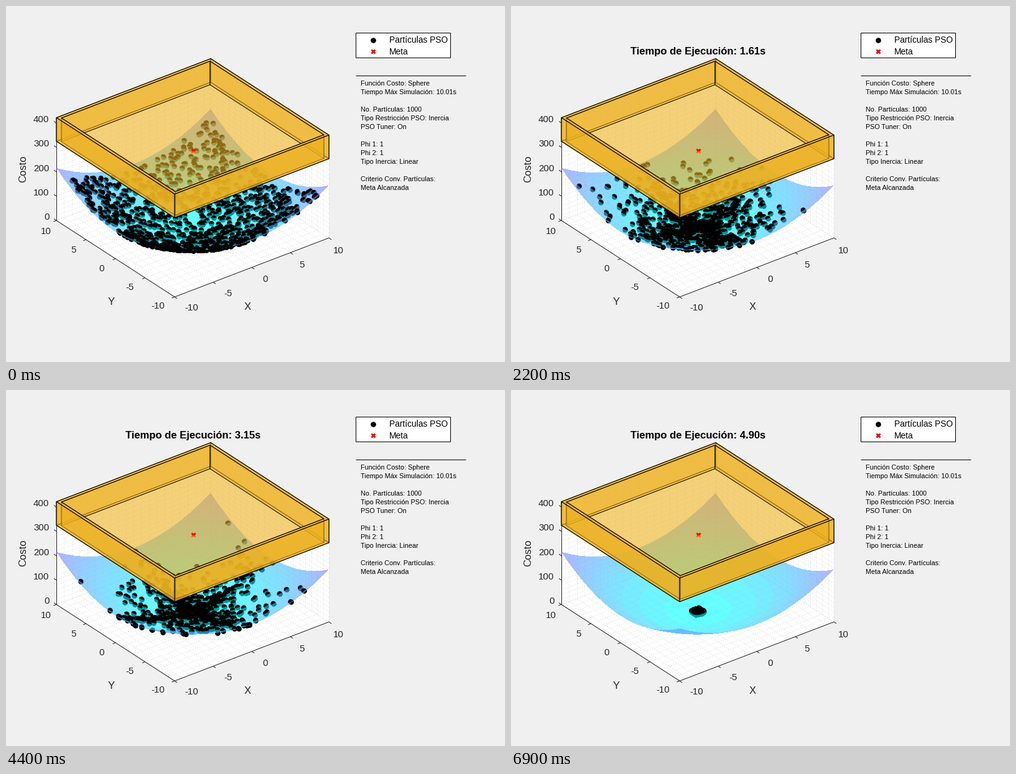
Write a matplotlib script that moves like this. It is 802 px wide and 573 px high and loops after 7000 ms.

```python
import numpy as np
import matplotlib.pyplot as plt
from matplotlib.animation import FuncAnimation
from matplotlib.collections import LineCollection, PolyCollection
from matplotlib.patches import PathPatch, Polygon, Rectangle
from matplotlib.path import Path

W, H, DPI = 802, 573, 100
PX = 72 / DPI                     # points per pixel
FRAMES, INTERVAL = 70, 100
TOP, BOTTOM, RIM = 165.5, 127.5, 0.963   # box heights in px, inner wall ratio
Z_UNIT = 0.3925                   # px per cost unit
BOWL, LIFT = 41, 2.5              # paraboloid height and offset in px
RADIUS = 4.3
GOLD = (0.929, 0.694, 0.125, 0.6)
INK = "0.15"

plt.rcParams["font.family"] = "Liberation Sans"
fig = plt.figure(figsize=(W / DPI, H / DPI), dpi=DPI, facecolor="#f0f0f0")
ax = fig.add_axes([0, 0, 1, 1])
ax.axis("off")
ax.set_autoscale_on(False)


def project(u, v, h=0):
    """Map normalised x, y in [-1, 1] and a height in px to the stage."""
    return 300 + 124 * u - 95 * v, 359.25 - 47.5 * u - 61.5 * v - h


def label(x, y, s, size, ha="left", **kw):
    """Text whose capitals are centred on y; size in px."""
    kw.setdefault("color", "black")
    return ax.text(x, y + 0.34 * size, s, fontsize=size * PX, ha=ha,
                   va="baseline", zorder=20, **kw)


def line(p, q, color=INK, z=1):
    ax.plot([p[0], q[0]], [p[1], q[1]], color=color, lw=PX, zorder=z,
            solid_capstyle="butt")


# ---------- axes box, grid, ticks ----------
def draw_axes():
    hull = [project(-1, 1), project(-1, 1, TOP), project(1, 1, TOP),
            project(1, -1, TOP), project(1, -1), project(-1, -1)]
    ax.add_patch(Polygon(hull, fc="white", ec="none", zorder=0))

    grid = []
    for k in np.linspace(-1, 1, 21):
        grid += [[project(k, -1), project(k, 1)],
                 [project(-1, k), project(1, k)],
                 [project(k, 1), project(k, 1, TOP)],
                 [project(1, k), project(1, k, TOP)]]
    for z in np.arange(0, 421, 20) * Z_UNIT:
        grid += [[project(-1, 1, z), project(1, 1, z)],
                 [project(1, -1, z), project(1, 1, z)]]
    ax.add_collection(LineCollection(grid, colors="0.84", linewidths=PX,
                                     linestyles=[(0, (1, 3))], zorder=0.5))

    left, front, right = project(-1, 1), project(-1, -1), project(1, -1)
    line(project(-1, 1, TOP), left)
    line(left, front)
    line(front, right)

    for i, val in enumerate(range(-10, 11, 5)):
        x, y = project(val / 10, -1)
        line((x, y), (x + 4, y + 2.6))
        label(298 + 59.2 * i, 485 - 23 * i, str(val), 15, "center", color=INK)
        x, y = project(-1, val / 10)
        line((x, y), (x - 4.5, y + 1.7))
        label(244 - 45 * i, 482 - 30 * i, str(val), 15, "center", color=INK)
    for i in range(5):
        x, y = project(-1, 1, 100 * i * Z_UNIT)
        line((x, y), (x - 4, y - 2.6))
        label(69.5, 339 - 39.2 * i, str(100 * i), 15, "right", color=INK)

    label(388, 483, "X", 16.67, "center", color=INK)
    label(169.5, 475, "Y", 16.67, "center", color=INK)
    ax.text(28, 262, "Costo", fontsize=12, rotation=90, ha="center",
            va="center", color=INK, zorder=20)


# ---------- translucent paraboloid ----------
def surface_layer(u, v):
    r2 = u ** 2 + v ** 2
    t = r2 / 4
    t = np.where(t < 0.18, np.round(t / 0.06) * 0.06, t)
    rgb = np.stack([t, 1 - t, np.ones_like(t)], -1)
    alpha = 0.6 * ((np.abs(u) <= 1) & (np.abs(v) <= 1))
    return rgb, alpha[..., None]


def draw_surface():
    x0, x1, y0, y1 = 78, 523, 160, 400
    x, y = np.meshgrid(np.arange(x0, x1) + 0.5, np.arange(y0, y1) + 0.5)
    # u = k + a v along each sight line; a quadratic in v remains
    a, k = 95 / 124, (x - 300) / 124
    qa = BOWL * (1 + a * a)
    qb = 47.5 * a + 61.5 + 2 * BOWL * a * k
    qc = y - (359.25 - LIFT) + 47.5 * k + BOWL * k ** 2
    disc = qb ** 2 - 4 * qa * qc
    root = np.sqrt(np.maximum(disc, 0))
    layers = []
    for sign in (1, -1):          # far sheet, then near sheet
        v = np.where(disc >= 0, (-qb + sign * root) / (2 * qa), 9)
        layers.append(surface_layer(k + a * v, v))
    (far, af), (near, an) = layers
    alpha = an + af * (1 - an)
    rgb = (near * an + far * af * (1 - an)) / np.maximum(alpha, 1e-6)
    rgba = np.clip(np.concatenate([rgb, alpha], -1), 0, 1)
    ax.imshow(rgba, extent=(x0, x1, y1, y0), interpolation="nearest",
              aspect="auto", zorder=3)


# ---------- golden frame ----------
def face(points, z):
    ax.add_patch(Polygon(points, fc=GOLD, ec="black", lw=PX, zorder=z,
                         joinstyle="round"))


def wall(p, q, z):
    face([project(*p, TOP), project(*q, TOP),
          project(*q, BOTTOM), project(*p, BOTTOM)], z)


def ring(r, h):
    return [project(r * u, r * v, h)
            for u, v in ((-1, 1), (1, 1), (1, -1), (-1, -1))]


def draw_box():
    r = RIM
    wall((-1, 1), (1, 1), 5)
    wall((1, 1), (1, -1), 5)
    face(ring(1, BOTTOM), 5.1)
    wall((-r, r), (r, r), 5.2)
    wall((r, r), (r, -r), 5.2)
    wall((-r, r), (-r, -r), 6)
    wall((-r, -r), (r, -r), 6)
    outer, inner = ring(1, TOP), ring(r, TOP)[::-1]
    codes = [Path.MOVETO] + [Path.LINETO] * 3 + [Path.CLOSEPOLY]
    path = Path(outer + outer[:1] + inner + inner[:1], codes * 2)
    ax.add_patch(PathPatch(path, fc=GOLD, ec="black", lw=PX, zorder=6.1))
    wall((-1, 1), (-1, -1), 6.2)
    wall((-1, -1), (1, -1), 6.2)


def cross(x, y, z):
    return ax.plot([x], [y], "x", color="red", ms=6.5 * PX, mew=2.8 * PX,
                   zorder=z)[0]


def draw_goal():
    cross(300.5, 232.5, 4.5)
    # the floor of the frame cuts the marker in half
    upper = cross(300.5, 232.5, 7)
    upper.set_clip_path(Rectangle((290, 222), 20, 11,
                                  transform=ax.transData))


# ---------- legend and notes ----------
def draw_notes():
    ax.add_patch(Rectangle((562, 43), 152, 40, fc="white", ec="black",
                           lw=PX, zorder=10))
    ax.plot([589.5], [54.5], "o", color="black", ms=2 * RADIUS * PX, mew=0,
            zorder=11)
    cross(589.5, 72.5, 11)
    label(616, 54, "Partículas PSO", 13.75)
    label(616, 73, "Meta", 13.75)
    line((562, 112), (739, 112), "black", 10)
    notes = ["Función Costo: Sphere", "Tiempo Máx Simulación: 10.01s", "",
             "No. Partículas: 1000", "Tipo Restricción PSO: Inercia",
             "PSO Tuner: On", "", "Phi 1: 1", "Phi 2: 1",
             "Tipo Inercia: Linear", "", "Criterio Conv. Partículas:",
             "Meta Alcanzada"]
    for i, s in enumerate(notes):
        label(570, 124.5 + 14 * i, s, 10.7)


# ---------- swarm ----------
rng = np.random.default_rng(7)
N = 1000
start = rng.uniform(-0.95, 0.95, (2, N))
swing = rng.uniform(-0.95, 0.95, (2, N))
omega = rng.normal(1.05, 0.12, N)

KEYS = [0, 4, 14, 18, 22, 31, 35, 39, 44, 49, 51, 62, 69]
SPREAD = [1, 1.25, 1.3, 1, 0.72, 0.58, 0.75, 0.9, 0.7, 0.26, 0.22, 0.1, 0.045]
POWER = [1, 1, 1, 1.3, 1.6, 2, 2.2, 2.5, 2.5, 2.5, 2.5, 1.6, 1]


def swarm(i):
    """Oscillating particles, clamped to the inner walls."""
    q = start * np.cos(omega * i) + swing * np.sin(omega * i)
    spread = np.exp(np.interp(i, KEYS, np.log(SPREAD)))
    power = np.interp(i, KEYS, POWER)
    return np.clip(spread * np.sign(q) * np.abs(q) ** power, -RIM, RIM)


def half_discs(u, v, x, y):
    """The half of every marker that stands in front of the surface."""
    slope = 2 * BOWL
    yu, yv = -47.5 - slope * u, -61.5 - slope * v
    du = 47.5 * 1.732 - 0.577 * slope * u
    dv = 61.5 * 1.732 - 0.577 * slope * v
    det = 124 * yv + 95 * yu
    gx = (du * yv - yu * dv) / det
    gy = (124 * dv + 95 * du) / det
    a = np.arctan2(gy, gx)[:, None] + np.linspace(-np.pi / 2, np.pi / 2, 13)
    return np.stack([x[:, None] + RADIUS * np.cos(a),
                     y[:, None] + RADIUS * np.sin(a)], -1)


draw_axes()
draw_surface()
draw_box()
draw_goal()
draw_notes()
discs = ax.scatter(np.zeros(N), np.zeros(N), s=(2 * RADIUS * PX) ** 2,
                   c="black", linewidths=0, zorder=2)
halves = PolyCollection([], facecolors="black", edgecolors="none", zorder=4)
ax.add_collection(halves)
title = label(300.5, 72.5, "", 16.67, "center", fontweight="bold")
ax.set_xlim(0, W)
ax.set_ylim(H, 0)


def update(i):
    u, v = swarm(i)
    x, y = project(u, v, LIFT + BOWL * (u ** 2 + v ** 2))
    discs.set_offsets(np.column_stack([x, y]))
    halves.set_verts(half_discs(u, v, x, y))
    title.set_text(f"Tiempo de Ejecución: {0.07 * (i + 1):.2f}s" if i else "")
    return discs, halves, title


anim = FuncAnimation(fig, update, frames=FRAMES, interval=INTERVAL,
                     init_func=lambda: update(0), repeat=True, repeat_delay=0)
plt.show()
```
